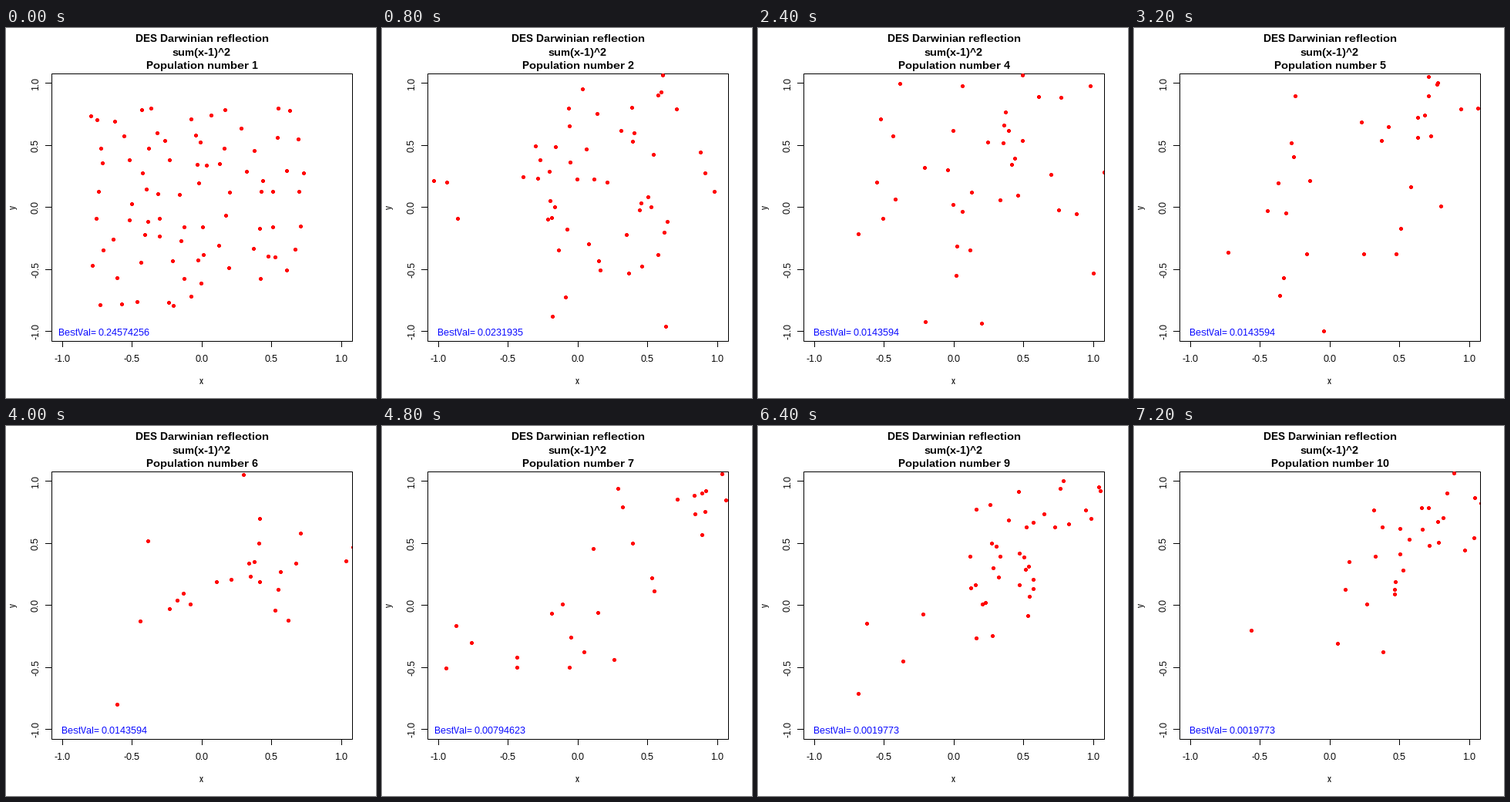
A matplotlib script for the animation above (8000 ms loop, 480 by 480 pixels).

```python
import matplotlib.pyplot as plt
import numpy as np
from matplotlib.animation import FuncAnimation
from matplotlib.collections import PolyCollection
from matplotlib.patches import Rectangle

SIZE, DPI = 480, 96
PX = 72 / DPI  # points per pixel
LEFT, TOP, RIGHT, BOTTOM = 59, 59, 449, 406

# For each population: best value, number of dots and its outermost dots.
GENERATIONS = [
    ("0.24574256", 80, [(110, 114), (217, 360), (386, 188), (188, 104)]),
    ("0.0231935", 52, [(67, 198), (368, 387), (431, 212), (364, 61)]),
    ("0.0143594", 42, [(74, 262), (262, 381), (431, 120), (352, 62)]),
    ("0.0143594", 38, [(130, 267), (290, 383), (449, 187), (343, 61)]),
    ("0.0143594", 30, [(122, 291), (246, 393), (446, 104), (382, 63)]),
    ("0.0143594", 24, [(144, 361), (184, 149), (450, 157), (308, 63)]),
    ("0.00794623", 27, [(83, 314), (116, 281), (446, 96), (441, 62)]),
    ("0.0019773", 33, [(148, 274), (221, 390), (447, 88), (419, 64)]),
    ("0.0019773", 40, [(130, 347), (141, 256), (444, 84), (396, 71)]),
    ("0.0019773", 29, [(152, 265), (323, 293), (450, 100), (415, 61)]),
]

# A hard-edged disc: a 5 x 5 square without its corners.
DOT = np.array([(-1.5, -2.5), (1.5, -2.5), (1.5, -1.5), (2.5, -1.5),
                (2.5, 1.5), (1.5, 1.5), (1.5, 2.5), (-1.5, 2.5),
                (-1.5, 1.5), (-2.5, 1.5), (-2.5, -1.5), (-1.5, -1.5)])


def scatter_evenly(rng, low, high, cols=10, rows=8):
    """One dot at a random place in each cell of a grid."""
    cells = np.stack(np.meshgrid(range(cols), range(rows)), -1).reshape(-1, 2)
    spots = (cells + rng.random(cells.shape)) / (cols, rows)
    return low + spots * (high - low)


def scatter_leaning(rng, low, high, age):
    """A cloud that drifts to the upper right and narrows with age."""
    centre = 270 + 12 * age, 200 - 6.5 * age
    sx, sy = 92 - 2.5 * age, 95 - 3.5 * age
    shared = -(0.25 + 0.07 * age) * sx * sy
    pts = rng.multivariate_normal(centre, [[sx**2, shared],
                                           [shared, sy**2]], 400)
    return pts[np.all((pts >= low) & (pts <= high), axis=1)]


def population(i):
    _, count, outer = GENERATIONS[i]
    rng = np.random.default_rng(20 + i)
    low, high = np.min(outer, axis=0), np.max(outer, axis=0)
    if i == 0:
        inner = scatter_evenly(rng, low, high)
    else:
        inner = scatter_leaning(rng, low, high, i - 1)
    return np.vstack([outer, np.round(inner[:count - len(outer)])])


# Whole-pixel glyph shapes and advances, no kerning.
plt.rcParams.update({"font.family": "Liberation Sans",
                     "text.hinting": "native",
                     "text.hinting_factor": 1,
                     "text.kerning_factor": 6})
fig = plt.figure(figsize=(SIZE / DPI, SIZE / DPI), dpi=DPI, facecolor="white")
ax = fig.add_axes([0, 0, 1, 1])
ax.axis("off")
ax.set_xlim(-0.5, SIZE - 0.5)  # whole numbers are pixel centres
ax.set_ylim(SIZE - 0.5, -0.5)


def label(x, y, text="", size=12, **style):
    return ax.text(x, y, text, fontsize=size * PX, ha="center",
                   va="baseline", rotation_mode="anchor", **style)


def heading(y, text=""):
    return label(253.5, y, text, 14, weight="bold")


def tick(xs, ys):
    ax.plot(xs, ys, color="black", lw=PX, snap=False, solid_capstyle="butt")


ax.add_patch(Rectangle((LEFT, TOP), RIGHT - LEFT, BOTTOM - TOP, fill=False,
                       ec="black", lw=PX, snap=False, joinstyle="miter"))

for value in (-1, -0.5, 0, 0.5, 1):
    x = int(254.4 + 180.9 * value)
    y = int(232.8 - 160.9 * value)
    tick([x, x], [BOTTOM, BOTTOM + 7.5])
    tick([LEFT, LEFT - 8.5], [y, y])
    label(x - 0.5, 432.5, f"{value:.1f}")
    label(41.5, y, f"{value:.1f}", rotation=90)

label(253, 461.5, "x")
label(12.5, 232, "y", rotation=90)
heading(17.5, "DES Darwinian reflection")
heading(35.5, "sum(x-1)^2")
counter = heading(52.5)
best = label(126.5, 398.5, color="#0000ff", zorder=4)

dots = PolyCollection([], facecolors="#ff0000", linewidths=0, zorder=3)
ax.add_collection(dots, autolim=False)
dots.set_clip_path(Rectangle((LEFT - 0.5, BOTTOM - 0.5), RIGHT - LEFT,
                             TOP - BOTTOM, transform=ax.transData))


def draw(i):
    dots.set_verts([DOT + p for p in population(i)])
    counter.set_text(f"Population number {i + 1}")
    best.set_text(f"BestVal= {GENERATIONS[i][0]}")
    return dots, counter, best


anim = FuncAnimation(fig, draw, frames=len(GENERATIONS), interval=800,
                     repeat=True, repeat_delay=0)
plt.show()
```
